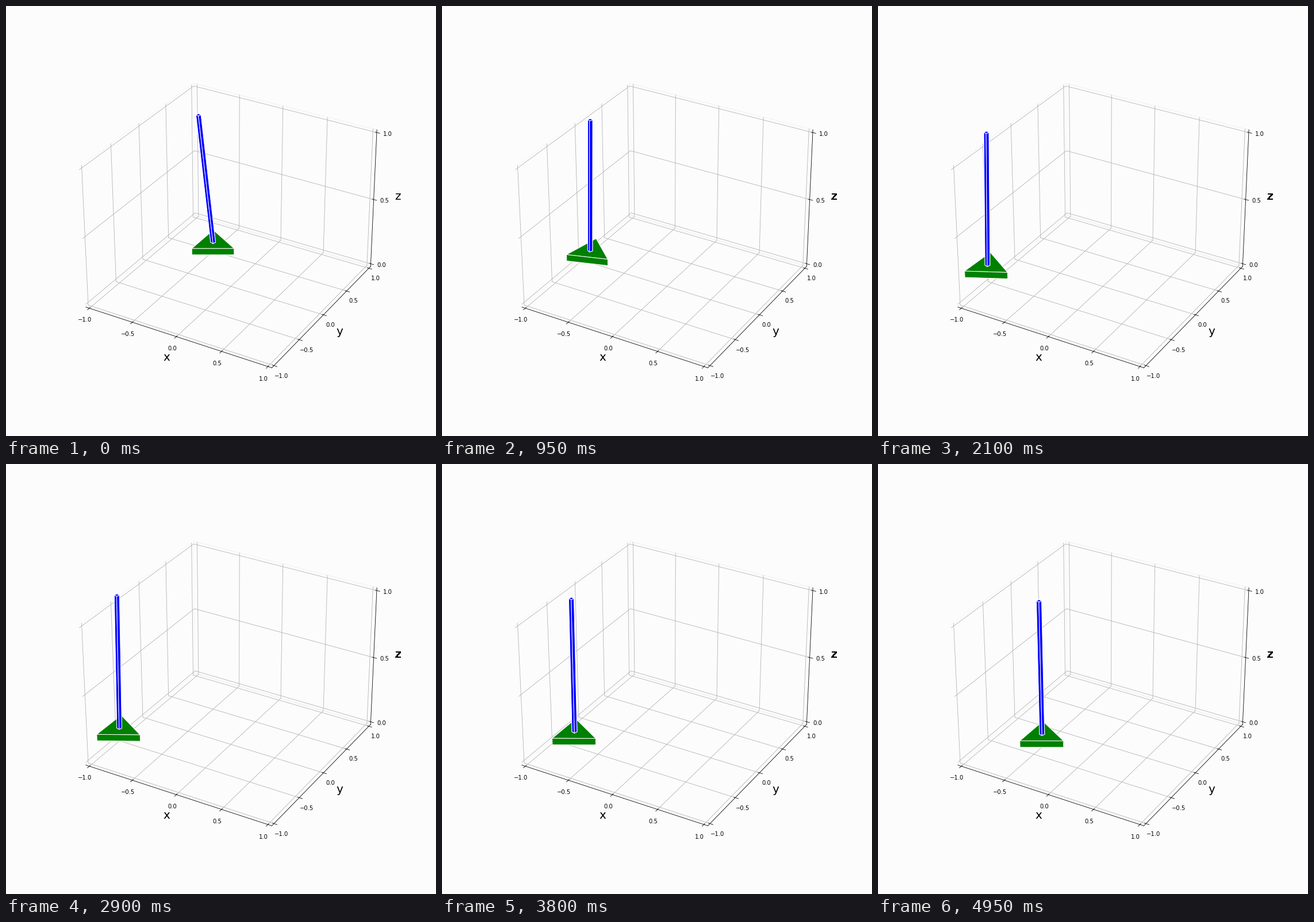
Animation, 748 px wide and 748 px high, one loop 5000 ms. Source, as a matplotlib script:

```python
import numpy as np
import matplotlib.pyplot as plt
from matplotlib.animation import FuncAnimation
from matplotlib.text import Text
from matplotlib.transforms import Bbox
from mpl_toolkits.mplot3d.art3d import Poly3DCollection

SIZE, DPI = 748, 72
FRAMES, INTERVAL = 100, 50
KNOT_STEP = 11          # frames between motion knots

BASE_R, BASE_H = 0.25, 0.05
ROD_R, ROD_LEN = 0.025, 1.0

plt.rcParams["axes3d.automargin"] = True


def spline(values):
    """Cubic spline through evenly spaced knots: at rest at first, free at the end."""
    y = np.array(values)
    n = len(y)
    a = np.eye(n)
    rhs = np.zeros(n)
    for i in range(1, n - 1):
        a[i, i - 1:i + 2] = 1, 4, 1
        rhs[i] = 3 * (y[i + 1] - y[i - 1])
    a[-1, -2:] = 1, 2
    rhs[-1] = 3 * (y[-1] - y[-2])
    m = np.linalg.solve(a, rhs)

    pos = np.arange(FRAMES) / KNOT_STEP
    k = np.minimum(pos.astype(int), n - 2)
    s = pos - k
    return ((1 + 2 * s) * (1 - s) ** 2 * y[k] + s * (1 - s) ** 2 * m[k]
            + s ** 2 * (3 - 2 * s) * y[k + 1] + s ** 2 * (s - 1) * m[k + 1])


# The cart drives under the falling rod, then heads back to the middle.
cart_x = spline([-.5, -.733, -.9915, -1.1, -1.12, -1.064, -.955, -.8205, -.679, -.5355])
cart_y = spline([.5, .2985, -.035, -.281, -.395, -.436, -.435, -.399, -.344, -.2855])
lean_x = spline([-.1, -.01, .034, .030, .026, .021, .012, .005, 0, -.004])
lean_y = spline([-.1, -.028, .022, .037, .025, .015, .010, .006, .002, -.001])
time = np.arange(FRAMES) * INTERVAL / 1000
heading = np.radians(120 - 71 * time * np.exp(-1.8 * time))


def prism(sides, radius, origin, axis, angle):
    """Faces of a prism whose first corner points along angle."""
    a = angle + 2 * np.pi * np.arange(sides) / sides
    ring = np.column_stack([np.cos(a), np.sin(a), 0 * a]) * radius
    low = ring + origin
    high = low + axis
    walls = []
    for i in range(sides):
        j = (i + 1) % sides
        walls.append(np.array([low[i], low[j], high[j], high[i]]))
    return [low, high] + walls


def base_faces(i):
    return prism(3, BASE_R, (cart_x[i], cart_y[i], 0), (0, 0, BASE_H), heading[i])


def rod_faces(i):
    dx, dy = lean_x[i], lean_y[i]
    axis = ROD_LEN * np.array([dx, dy, np.sqrt(1 - dx ** 2 - dy ** 2)])
    return prism(4, ROD_R, (cart_x[i], cart_y[i], BASE_H), axis, heading[i])


class Overprint(Text):
    """Text printed several times in place, so its soft edges build up."""
    count = 0

    def draw(self, renderer):
        for _ in range(self.count):
            super().draw(renderer)


def overprint(text, clip):
    copy = Overprint(*text.get_position(), text.get_text())
    copy.update_from(text)
    copy.set_clip_box(clip)
    copy.set_clip_on(True)
    fig.add_artist(copy)
    return copy


fig = plt.figure(figsize=(SIZE / DPI, SIZE / DPI), dpi=DPI, facecolor="#fcfcfc")
ax = fig.add_subplot(projection="3d", facecolor="none")
ax.set(xlim=(-1, 1), ylim=(-1, 1), zlim=(0, 1))
ticks = [-1, -.5, 0, .5, 1]
ax.set_xticks(ticks)
ax.set_yticks(ticks)
ax.set_zticks([0, .5, 1])
ax.set_xlabel("x", fontsize=20, labelpad=5)
ax.set_ylabel("y", fontsize=20, labelpad=5)
ax.set_zlabel("z", fontsize=20, labelpad=5)
for axis in (ax.xaxis, ax.yaxis, ax.zaxis):
    axis.pane.fill = False

base = Poly3DCollection(base_faces(0), facecolors="green", edgecolors="white", linewidths=1)
rod = Poly3DCollection(rod_faces(0), facecolors="blue", edgecolors="white", linewidths=1)
ax.add_collection3d(base)
ax.add_collection3d(rod)

# Lettering right of the axes area is never wiped and grows heavier.
fig.canvas.draw()
margin = Bbox.from_extents(int(ax.bbox.x1), 0, SIZE, SIZE)
heavy = [overprint(t, margin)
         for t in (ax.zaxis.label, ax.zaxis.get_major_ticks()[-1].label1)]


def update(i):
    base.set_verts(base_faces(i))
    rod.set_verts(rod_faces(i))
    for text in heavy:
        text.count = i
    return [base, rod, *heavy]


anim = FuncAnimation(fig, update, frames=FRAMES, interval=INTERVAL, repeat=True, blit=False)
plt.show()
```
